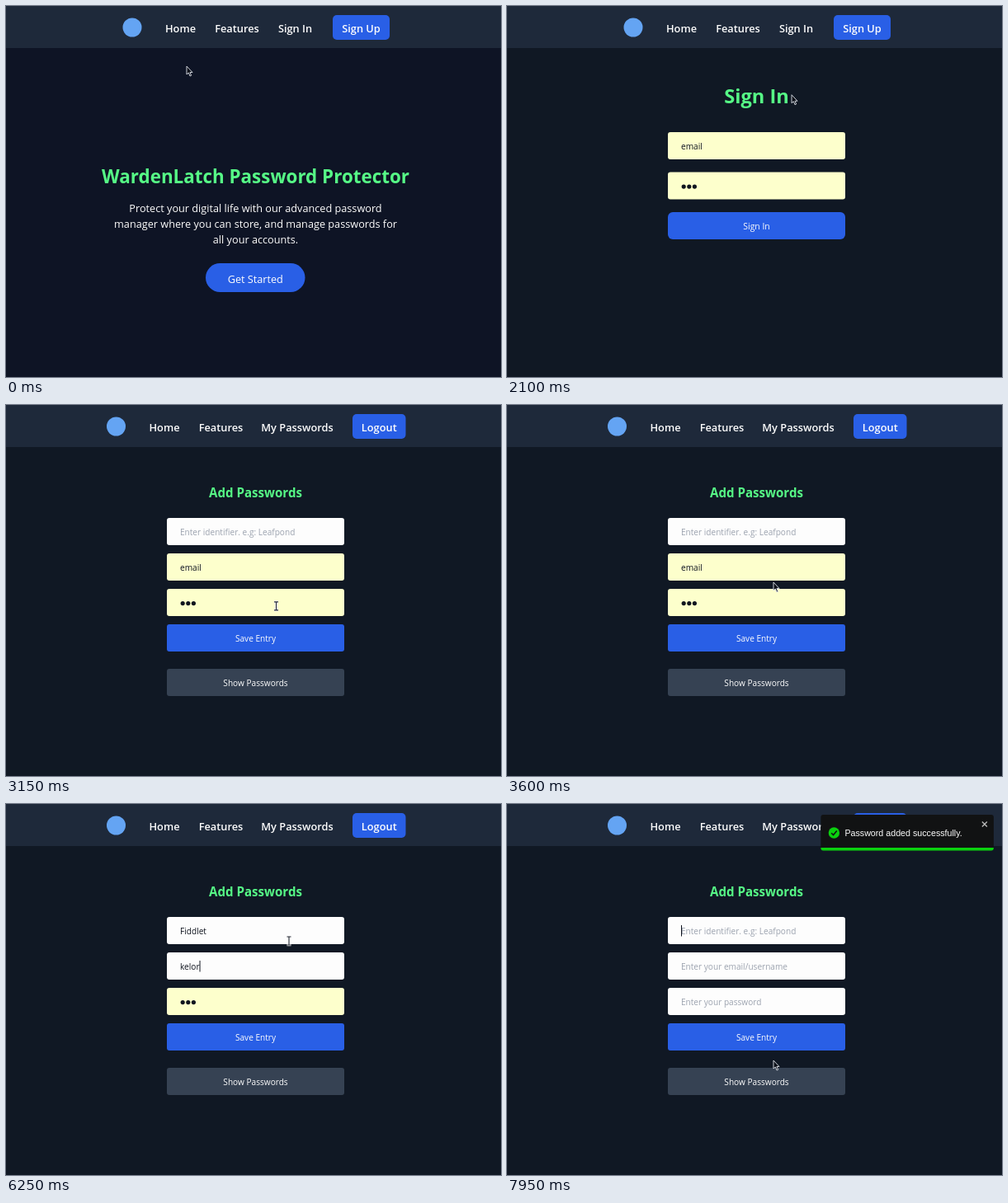
Recreate the animation shown at these times as an HTML page with a canvas. Size 600 px wide and 450 px high, loop 8 s.

```html
<!DOCTYPE html>
<html lang="en">
<head>
<meta charset="utf-8">
<title>Password manager demo</title>
<style>
  html, body { margin: 0; width: 100%; height: 100%; overflow: hidden; background: #101824; }
  canvas { display: block; }
</style>
</head>
<body>
<canvas id="stage" width="600" height="450"></canvas>
<script>
const ctx = document.getElementById('stage').getContext('2d');
const LOOP = 8000;
const SANS = '"Open Sans", "Noto Sans", sans-serif';
const WHITE = '#fdfdfd', INK = '#10151f', GREEN = '#56fa86', YELLOW = '#fdffcc';
const BLUE = '#295fe6', BLUE_HOVER = '#2149d4', GREY = '#364253';
const CENTER = 302.5;

// Moments at which the page state changes.
const SIGN_IN_PAGE = 1800, APP_PAGE = 2900;
const FOCUS_ID = 4050, TYPE_ID = 4300;
const FOCUS_USER = 5600, TYPE_USER = 5800;
const FOCUS_PASS = 6650, TYPE_PASS = 6850;
const SAVED = 7494;

// Pointer stops: time, x, y.
const POINTER = [
  [0, 219, 73], [450, 270, 190], [900, 385, 237], [1350, 411, 138], [1700, 352, 29],
  [1850, 352, 29], [2500, 331, 266], [2900, 331, 266], [3450, 323, 215], [3620, 323, 215],
  [4000, 343, 166], [7180, 343, 166], [7420, 323, 288], [7700, 323, 288], [7930, 323, 311]
];

const smooth = p => p * p * (3 - 2 * p);
const easeOut = p => 1 - (1 - p) ** 3;

function track(stops, t, ease) {
  const next = stops.findIndex(s => s[0] > t);
  if (next < 0) return stops[stops.length - 1].slice(1);
  if (next === 0) return stops[0].slice(1);
  const a = stops[next - 1], b = stops[next];
  const p = ease((t - a[0]) / (b[0] - a[0]));
  return a.slice(1).map((v, i) => v + (b[i + 1] - v) * p);
}

function box(x, y, w, h, r, color) {
  ctx.fillStyle = color;
  ctx.beginPath();
  ctx.roundRect(x, y, w, h, r);
  ctx.fill();
}

function disc(x, y, r, color) {
  ctx.fillStyle = color;
  ctx.beginPath();
  ctx.arc(x, y, r, 0, 7);
  ctx.fill();
}

function text(str, x, y, size, color = WHITE, weight = 400, align = 'center', family = SANS) {
  ctx.font = `${weight} ${size}px ${family}`;
  ctx.textAlign = align;
  ctx.fillStyle = color;
  ctx.fillText(str, x, y);
}

const typed = (str, start, step, t) => str.slice(0, Math.max(0, Math.floor((t - start) / step) + 1));
const blinkOn = since => since % 1000 < 500;

// Each drawn control also registers the area in which the pointer changes shape.
let zones, mouse;

function zone(x, y, w, h, cursor) {
  const over = mouse.x >= x && mouse.x <= x + w && mouse.y >= y && mouse.y <= y + h;
  if (over) zones.push(cursor);
  return over;
}

function button(label, x, y, w, h, r, opts = {}) {
  const { color = BLUE, hover = BLUE_HOVER, size = 10.1, weight = 400, base = y + h / 2 + 4.3 } = opts;
  box(x, y, w, h, r, zone(x, y, w, h, 'hand') ? hover : color);
  text(label, x + w / 2, base, size, WHITE, weight);
}

function field(y, { value = '', placeholder = '', dots = 0, color = WHITE, selected = false, caret = false }) {
  box(195, y, 215, 33, 3, color);
  zone(195, y, 215, 33, 'beam');
  ctx.font = `10.1px ${SANS}`;
  const width = dots ? dots * 6.6 : ctx.measureText(value).width;
  if (selected) box(211, y + 10, width, 14, 0, '#2b73d8');
  const ink = selected ? WHITE : INK;
  for (let i = 0; i < dots; i++) disc(214.2 + i * 6.6, y + 17.6, 2.6, ink);
  if (value) text(value, 211, y + 20.8, 10.1, ink, 400, 'left');
  else if (!dots) text(placeholder, 211, y + 20.8, 10.1, '#9ca3af', 400, 'left');
  if (caret) box(211 + width, y + 10, 1, 13.5, 0, INK);
}

function navBar(logoX, links, action, actionX, actionW) {
  box(0, 0, 600, 51, 0, '#1e293a');
  disc(logoX, 26, 11.5, '#64a4f3');
  for (const [label, x] of links) {
    text(label, x, 32, 12.8, WHITE, 600);
    zone(x - 26, 16, 52, 22, 'hand');
  }
  button(action, actionX, 11, actionW, 30, 5, { size: 12.8, weight: 600, base: 32 });
}

const guestNav = () =>
  navBar(153, [['Home', 211.5], ['Features', 280], ['Sign In', 350.5]], 'Sign Up', 396, 69);

function homePage() {
  guestNav();
  text('WardenLatch Password Protector', CENTER, 215, 22.4, GREEN, 700);
  ['Protect your digital life with our advanced password',
   'manager where you can store, and manage passwords for',
   'all your accounts.'].forEach((line, i) => text(line, CENTER, 249.5 + i * 19, 12.7));
  button('Get Started', 242, 312, 120.5, 35, 17.5, { size: 12.7, base: 335.7 });
}

function signInPage() {
  guestNav();
  text('Sign In', CENTER, 118, 23.6, GREEN, 700);
  field(153, { value: 'email', color: YELLOW });
  field(201.5, { dots: 3, color: YELLOW });
  button('Sign In', 195, 250, 215, 33, 6, { size: 10.4 });
}

function appPage(t) {
  navBar(133.5, [['Home', 192], ['Features', 260.5], ['My Passwords', 353]], 'Logout', 420, 64.5);
  text('Add Passwords', CENTER, 112, 15.1, GREEN, 700);

  const saved = t >= SAVED;
  const userEdited = t >= TYPE_USER, passEdited = t >= TYPE_PASS;
  const idKeys = [FOCUS_ID, TYPE_ID + 690];
  const idSince = saved ? t - SAVED : t < TYPE_ID ? t - idKeys[0] : Math.max(0, t - idKeys[1]);

  field(137, {
    value: saved ? '' : typed('Fiddlet', TYPE_ID, 115, t),
    placeholder: 'Enter identifier. e.g: Leafpond',
    caret: (saved || (t >= FOCUS_ID && t < FOCUS_USER)) && blinkOn(idSince)
  });
  field(180, {
    value: saved ? '' : userEdited ? typed('kelorrr', TYPE_USER, 110, t) : 'email',
    placeholder: 'Enter your email/username',
    color: userEdited ? WHITE : YELLOW,
    selected: t >= FOCUS_USER && !userEdited,
    caret: userEdited && t < FOCUS_PASS
  });
  field(223, {
    dots: saved ? 0 : passEdited ? Math.min(4, Math.floor((t - TYPE_PASS) / 80) + 1) : 3,
    placeholder: 'Enter your password',
    color: passEdited ? WHITE : YELLOW,
    selected: t >= FOCUS_PASS && !passEdited,
    caret: passEdited && t < 7450
  });
  button('Save Entry', 195, 266, 215, 33, 3);
  button('Show Passwords', 195, 320, 215, 33, 3, { color: GREY, hover: '#475366' });
  if (saved) toast((t - SAVED) / 700);
}

// Slides in from far right and bounces to rest.
function toast(p) {
  const [dx] = track([[0, 1960], [0.6, -16], [0.75, 6.5], [0.9, -3.3], [1, 0]], p, easeOut);
  ctx.save();
  ctx.translate(380 + dx, 13);
  box(0, 0, 209.5, 43, 3, '#111213');
  box(0, 40, 209.5, 3.5, [0, 0, 3, 3], '#0bd00f');
  disc(16, 22, 6.7, '#0bd00f');
  line('M12.8 22.2L15.2 24.6L19.4 19.6', '#111213', 1.6);
  text('Password added successfully.', 29, 26, 10.7, WHITE, 400, 'left', '"Liberation Sans", Arial, sans-serif');
  line('M195.5 8.5L201.5 14.5M201.5 8.5L195.5 14.5', '#b8b8b8', 1.4);
  ctx.restore();
}

function line(d, color, width, fill) {
  const path = new Path2D(d);
  if (fill) {
    ctx.fillStyle = fill;
    ctx.fill(path);
  }
  ctx.strokeStyle = color;
  ctx.lineWidth = width;
  ctx.stroke(path);
}

const cursors = {
  arrow: () => line('M0 0V10L2.3 8L4 12L5.6 11.3L4 7.5H7Z', '#dfe3ea', 0.9, '#0c1019'),
  hand: () => line('M-1.2 1Q0 -1 1.2 1V4.5L5 5.6Q6.8 6.3 6.4 8.6L5 12.5H-0.8L-4 8Q-3.8 6 -1.2 7.5Z', '#1a2030', 0.8, '#fff'),
  beam: () => {
    const d = 'M-2.5 -5H2.5M0 -5V5M-2.5 5H2.5';
    line(d, '#fff', 2.6);
    line(d, '#222732', 1.1);
  }
};

function draw(t) {
  const [x, y] = track(POINTER, t, smooth);
  mouse = { x, y };
  zones = [];
  box(0, 0, 600, 450, 0, t < SIGN_IN_PAGE ? '#0e1425' : '#101824');
  if (t < SIGN_IN_PAGE) homePage();
  else if (t < APP_PAGE) signInPage();
  else appPage(t);

  ctx.save();
  ctx.translate(x, y);
  cursors[zones[0] || 'arrow']();
  ctx.restore();
}

function frame() {
  draw(performance.now() % LOOP);
  requestAnimationFrame(frame);
}
frame();
</script>
</body>
</html>
```
